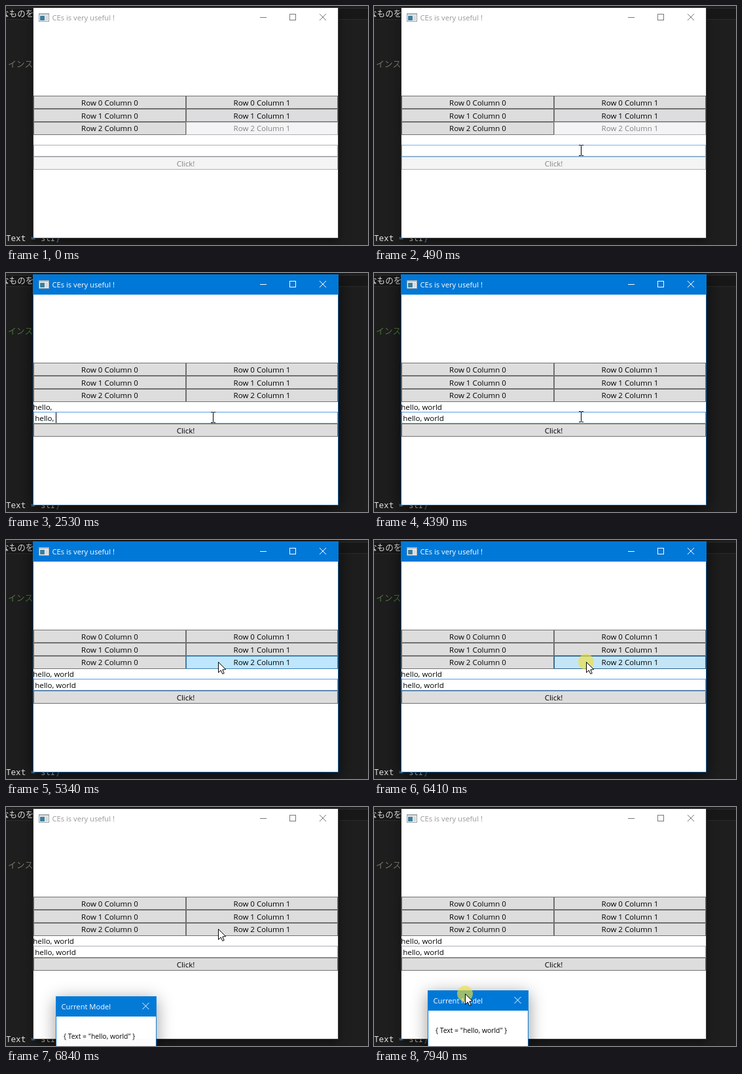
These frames come from a looping animation (553 px wide and 365 px high, 7.99 s). An HTML page with a canvas:

```html
<!DOCTYPE html>
<html lang="ja">
<head>
<meta charset="utf-8">
<title>CEs is very useful !</title>
<style>
html, body { margin: 0; width: 553px; height: 365px; overflow: hidden; background: #1e1e1e; }
canvas { display: block; }
</style>
</head>
<body>
<canvas id="stage" width="553" height="365"></canvas>
<script>
const LOOP = 7990;
const ctx = document.getElementById('stage').getContext('2d');
const SANS = '"Open Sans", "Noto Sans", sans-serif';
const MONO = '"Noto Sans Mono", "DejaVu Sans Mono", monospace';
const CJK = '"Noto Sans CJK JP", "Noto Sans CJK", sans-serif';
const BLUE = '#0078d7';

// when each further character lands; the first entry brings two
const KEYS = [1510, 1690, 1905, 2135, 2350, 2530, 2735, 2990, 3270, 3615, 3780];
const PHRASE = 'hello, world';
const CARET = [[750, 1280], [1510, 4390], [4880, 5340], [5950, 6410]];
const PRESS = [[670, 850], [6410, 6560], [7780, LOOP]];
const PATH = [
  [120, 356, 298], [490, 316, 220], [4380, 316, 220], [4420, 316, 215],
  [4590, 316, 215], [4880, 319, 181], [5150, 319, 181], [5340, 324, 186],
  [7220, 324, 186], [7700, 133, 294], [7800, 133, 294], [7940, 139, 285]
];

const within = (t, spans) => spans.some(([a, b]) => t >= a && t < b);
const clamp = u => Math.min(1, Math.max(0, u));
const smooth = u => u * u * (3 - 2 * u);

function pointer(t) {
  let i = 0;
  while (i < PATH.length - 2 && t >= PATH[i + 1][0]) i++;
  const [t0, x0, y0] = PATH[i], [t1, x1, y1] = PATH[i + 1];
  const u = smooth(clamp((t - t0) / (t1 - t0)));
  return { x: Math.round(x0 + (x1 - x0) * u), y: Math.round(y0 + (y1 - y0) * u) };
}

function rect(x, y, w, h, color) {
  ctx.fillStyle = color;
  ctx.fillRect(x, y, w, h);
}

function box(x, y, w, h, fill, border) {
  rect(x, y, w, h, border);
  rect(x + 1, y + 1, w - 2, h - 2, fill);
}

function text(str, x, y, size, color, align = 'left', family = SANS) {
  ctx.font = `${size}px ${family}`;
  ctx.textAlign = align;
  ctx.fillStyle = color;
  ctx.fillText(str, x, y);
}

function lines(color, ...segs) {
  ctx.strokeStyle = color;
  ctx.lineWidth = 1;
  ctx.beginPath();
  for (const [a, b, c, d] of segs) {
    ctx.moveTo(a, b);
    ctx.lineTo(c, d);
  }
  ctx.stroke();
}

function cross(x, y, color) {
  lines(color, [x, y, x + 10, y + 10], [x + 10, y, x, y + 10]);
}

// soft shadow outside the box only
function shadow(x, y, w, h, blur, alpha) {
  ctx.save();
  ctx.beginPath();
  ctx.rect(-100, -100, 800, 700);
  ctx.rect(x, y, w, h);
  ctx.clip('evenodd');
  ctx.shadowColor = `rgba(0,0,0,${alpha})`;
  ctx.shadowBlur = blur;
  ctx.shadowOffsetY = 5;
  rect(x, y, w, h, '#000');
  ctx.restore();
}

function editor(active) {
  rect(0, 0, 553, 365, '#1e1e1e');
  box(-2, 3, 557, 18, '#181818', '#2c2c2c');
  text('なものを', -8, 16, 12.6, '#dcdcdc', 'left', CJK);
  text('インス', 3, 93, 12.8, active ? '#50793f' : '#77776c', 'left', CJK);
  text('Text', 0, 359, 12.6, '#e4e4e4', 'left', MONO);
  text('=', 37.8, 359, 12.6, '#569cd6', 'left', MONO);
  text('str', 52.9, 359, 12.6, '#dcdcdc', 'left', MONO);
  text('}', 75.6, 359, 12.6, '#569cd6', 'left', MONO);
}

function button(label, x, y, w, look) {
  const [fill, border, ink] = {
    normal: ['#dddddd', '#707070', '#000'],
    off: ['#f4f4f4', '#adb2b5', '#838383'],
    hover: ['#bee6fd', '#3c7fb1', '#000'],
    down: ['#c4e5f6', '#2c628b', '#000']
  }[look];
  box(x, y, w, 20, fill, border);
  text(label, x + w / 2, y + (y === 177 ? 14 : 15), 11.5, ink, 'center');
}

function titleBar(active) {
  const ink = active ? '#fff' : '#777';
  if (active) rect(41, 2, 467, 31, BLUE);
  box(50, 11, 16, 13, '#f2f4f5', '#9aa3a8');
  rect(51, 12, 14, 2, '#c3ccd2');
  rect(52, 15, 7, 7, '#3f7d9e');
  rect(60, 15, 4, 7, '#d5dadd');
  text('CEs is very useful !', 70.5, 22, 11.2, active ? '#fff' : '#999');
  lines(ink, [388, 17.5, 398, 17.5]);
  ctx.strokeRect(433.5, 12.5, 9, 9);
  cross(479, 12, ink);
}

function mainWindow(t, active, mouse) {
  const typed = KEYS.filter(k => t >= k).length;
  const value = typed ? PHRASE.slice(0, typed + 1) : '';
  const idle = typed ? 'normal' : 'off';

  shadow(42, 3, 465, 351, active ? 26 : 14, active ? 0.75 : 0.5);
  rect(41, 2, 467, 353, active ? '#1464a8' : '#3a3a3a');
  rect(42, 3, 465, 351, '#fff');
  titleBar(active);

  let last = idle;
  if (t > 4000 && t < 6560 && mouse.y < 197) last = t >= 6410 ? 'down' : 'hover';
  for (let row = 0; row < 3; row++) {
    const y = 137 + row * 20;
    button(`Row ${row} Column 0`, 42, y, 233, 'normal');
    button(`Row ${row} Column 1`, 275, y, 232, row === 2 ? last : 'normal');
  }

  const over = t >= 120 && t < 740 && mouse.y < 230;
  const edge = active ? '#569de5' : over ? '#7eb4ea' : '#abadb3';
  text(value, 41.3, 209, 11.5, '#000');
  box(42, 212, 465, 18, '#fff', edge);
  text(value, 44.2, 226, 11.5, '#000');
  if (within(t, CARET)) {
    const x = Math.max(45, Math.floor(44.2 + ctx.measureText(value).width));
    rect(x, 213, 1, 16, '#000');
  }
  button('Click!', 42, 230, 465, idle);
}

function dialog(t, mouse) {
  const u = clamp((t - 6560) / 320);
  if (u === 0) return;
  const alpha = 1 - (1 - u) ** 2;
  const scale = 0.94 + 0.06 * alpha;
  const drag = t >= 7800 ? [mouse.x - 133, mouse.y - 294] : [0, 0];

  ctx.save();
  ctx.translate(drag[0], drag[1]);
  ctx.translate(153, 350);
  ctx.scale(scale, scale);
  ctx.translate(-153, -350);
  ctx.globalAlpha = alpha;
  shadow(76, 289, 154, 122, 24, 0.42);
  rect(76, 289, 154, 31, BLUE);
  rect(76, 320, 1, 90, BLUE);
  rect(229, 320, 1, 90, BLUE);
  rect(77, 320, 152, 90, '#fff');
  text('Current Model', 84.5, 309, 11.2, '#fff');
  cross(208.5, 299, '#fff');
  text('{ Text = "hello, world" }', 88, 354, 10.4, '#000');
  ctx.restore();
}

function drawPointer(t, { x, y }) {
  if (t < 120) return;
  if (within(t, PRESS)) {
    ctx.fillStyle = 'rgba(238,224,60,0.65)';
    ctx.beginPath();
    ctx.arc(x, y, 12, 0, Math.PI * 2);
    ctx.fill();
  }
  if (t < 6000 && y >= 212 && y < 230) {
    rect(x, y - 7, 1, 15, '#000');
    for (const dy of [-8, 8]) {
      rect(x - 3, y + dy, 3, 1, '#000');
      rect(x + 1, y + dy, 3, 1, '#000');
    }
    return;
  }
  ctx.save();
  ctx.translate(x + 0.5, y + 0.5);
  ctx.beginPath();
  ctx.moveTo(0, 0);
  ctx.lineTo(0, 16);
  ctx.lineTo(3.7, 12.5);
  ctx.lineTo(6.3, 18);
  ctx.lineTo(8.7, 17);
  ctx.lineTo(6.3, 11.5);
  ctx.lineTo(11.2, 11.2);
  ctx.closePath();
  ctx.fillStyle = '#fff';
  ctx.fill();
  ctx.strokeStyle = '#000';
  ctx.lineWidth = 1;
  ctx.stroke();
  ctx.restore();
}

function draw(t) {
  const mouse = pointer(t);
  const active = t >= 740 && t < 6560;
  editor(active);
  mainWindow(t, active, mouse);
  dialog(t, mouse);
  drawPointer(t, mouse);
}

const start = performance.now();
function tick() {
  draw((performance.now() - start) % LOOP);
  requestAnimationFrame(tick);
}
tick();
</script>
</body>
</html>
```
